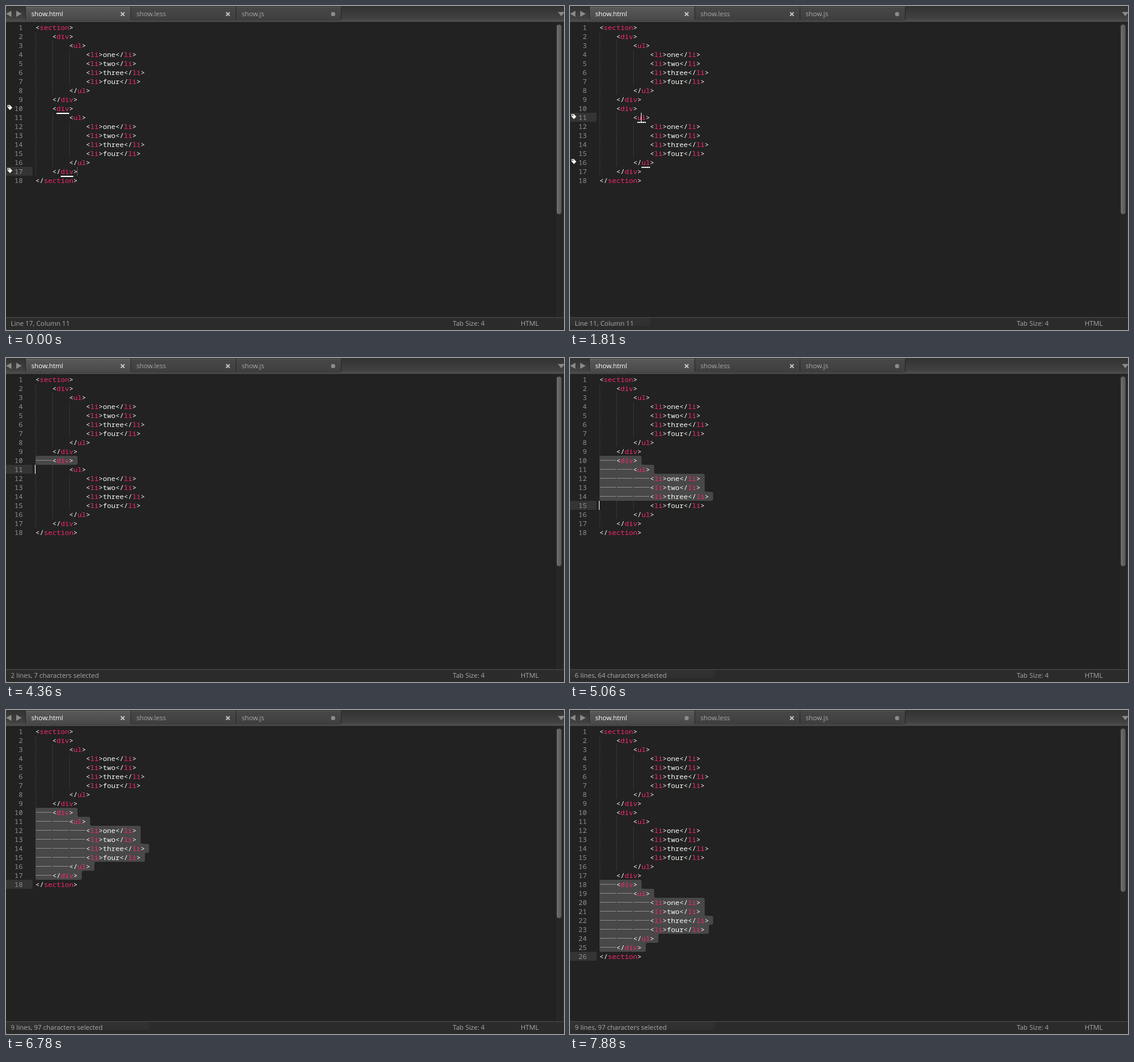
An HTML page for the animation above (8000 ms loop, 928 px wide and 540 px high).

```html
<!DOCTYPE html>
<html lang="en">
<head>
<meta charset="utf-8">
<title>Editor: duplicating a block</title>
<style>
  html, body { margin: 0; width: 100%; height: 100%; overflow: hidden; background: #222; }
  svg { display: block; width: 928px; height: 540px; }
  text { white-space: pre; }
  .ui { font: 11px "Open Sans", "Noto Sans", sans-serif; fill: #a8a8a8; }
  .code { font: 11.667px "Noto Sans Mono", "DejaVu Sans Mono", monospace; fill: #f8f8f2; }
  .code .tag { fill: #f92672; }
  .code .num { fill: #8f908a; text-anchor: end; }
</style>
</head>
<body>
<svg viewBox="0 0 928 540" xmlns="http://www.w3.org/2000/svg">
  <defs>
    <linearGradient id="bar" x2="0" y2="1"><stop stop-color="#323232"/><stop offset="1" stop-color="#444"/></linearGradient>
    <linearGradient id="front" x2="0" y2="1"><stop stop-color="#5a5a5a"/><stop offset="1" stop-color="#484848"/></linearGradient>
    <linearGradient id="back" x2="0" y2="1"><stop stop-color="#484848"/><stop offset="1" stop-color="#3e3e3e"/></linearGradient>
    <linearGradient id="thumb"><stop stop-color="#707070"/><stop offset="1" stop-color="#555"/></linearGradient>
  </defs>
  <rect width="928" height="540" fill="#222"/>
  <g id="tabs"></g>
  <path d="M912.5 28V518" stroke="#1c1c1c"/>
  <rect x="913" y="28" width="14" height="490" fill="#262626"/>
  <rect x="927" y="28" width="1" height="490" fill="#333"/>
  <rect id="scroll" x="916" y="31" width="8" rx="4" fill="url(#thumb)"/>
  <g id="editor"></g>
  <rect y="518" width="928" height="22" fill="#2b2b2b"/>
  <rect y="519" width="928" height="1" fill="#484848"/>
  <rect id="patch" y="520" height="13" fill="#313131"/>
  <g class="ui">
    <text id="message" x="8" y="533"></text>
    <text x="743" y="533">Tab Size: 4</text>
    <text x="856" y="533">HTML</text>
  </g>
</svg>
<script>
(() => {
const LOOP = 8000, LEFT = 49, CHAR = 7, ROW = 15, TAB = 4;
const SELECT_AT = 4360, DUPLICATE_AT = 7330;
const $ = id => document.getElementById(id);

const block = ['\t<div>', '\t\t<ul>',
  ...['one', 'two', 'three', 'four'].map(word => `\t\t\t<li>${word}</li>`),
  '\t\t</ul>', '\t</div>'];
const page = copies => ['<section>', ...Array(copies).fill(block).flat(), '</section>'];

// time, line, column, caret opacity (1 if left out)
const steps = [
  [0, 17, 11, .3], [150, 18, 11], [550, 18, 11, .5], [700, 18, 11, 0],
  [950, 17, 11], [1080, 16, 11], [1230, 15, 9], [1380, 14, 9], [1690, 12, 9],
  [1810, 11, 11], [2330, 11, 11, .5], [2450, 11, 11, 0], [2860, 11, 11],
  [2980, 10, 10], [3260, 10, 9], [3540, 10, 8], [3690, 10, 7], [3970, 10, 6],
  [4090, 10, 5], [4240, 10, 1],
  [4360, 11, 1], [4640, 12, 1], [4780, 13, 1], [4920, 14, 1], [5060, 15, 1],
  [5210, 16, 1], [5650, 16, 1, .5], [5800, 16, 1, 0], [5950, 17, 1],
  [6230, 18, 1], [6660, 18, 1, .5], [6780, 18, 1, 0],
  [7330, 26, 1], [7760, 26, 1, .5], [7880, 26, 1, 0]
];

const rect = (x, y, w, h, fill, extra = '') =>
  `<rect x="${x}" y="${y}" width="${w}" height="${h}" fill="${fill}" ${extra}/>`;
const rowTop = line => 28 + ROW * (line - 1);
const depth = row => row.match(/^\t*/)[0].length;
const columns = row => row.length + depth(row) * (TAB - 1);
const xAt = offset => LEFT + CHAR * offset;
const escapeTags = s => s.replace(/</g, '&lt;').replace(/>/g, '&gt;');

function codeRow(row, i) {
  const line = i + 1, y = rowTop(line) + 12;
  const marked = escapeTags(row.trim()).replace(/(&lt;\/?)(\w+)/g, '$1<tspan class="tag">$2</tspan>');
  return `<text class="num" x="28" y="${y}">${line}</text>` +
    `<text x="${xAt(depth(row) * TAB)}" y="${y}">${marked}</text>`;
}

function guides(row, i, selected) {
  const y = rowTop(i + 1);
  let out = '';
  for (let d = 0; d < depth(row); d++) {
    const x = xAt(d * TAB);
    out += selected
      ? `<path d="M${x + 1} ${y + 7.5}h26" stroke="#8c8c8c"/>`
      : `<path d="M${x + .5} ${y + (i % 2)}V${y + ROW}" stroke="#484848" stroke-dasharray="1 1"/>`;
  }
  return out;
}

// Outline of the selected rows with every corner rounded, inner ones too
function selection(rows, from, to) {
  const pts = [[LEFT, rowTop(from)]];
  for (let n = from; n < to; n++) {
    const x = xAt(columns(rows[n - 1]) + 1);
    const last = pts[pts.length - 1];
    if (n > from && last[0] === x) last[1] = rowTop(n + 1);
    else pts.push([x, rowTop(n)], [x, rowTop(n + 1)]);
  }
  pts.push([LEFT, rowTop(to)]);
  const toward = (a, b) => a.map((v, k) => v + 3 * Math.sign(b[k] - v));
  const d = pts.map((p, i) => {
    const before = pts[(i + pts.length - 1) % pts.length], after = pts[(i + 1) % pts.length];
    return `${i ? 'L' : 'M'}${toward(p, before)}Q${p} ${toward(p, after)}`;
  }).join('');
  return `<path d="${d}Z" fill="#484848"/>`;
}

function matchedTags(rows, line, col) {
  const pair = line === 18 ? [1, 18] : line === 17 || line === 10 ? [10, 17] : [11, 16];
  const span = n => {
    const [, open, name] = rows[n - 1].match(/(<\/?)(\w+)/);
    const start = depth(rows[n - 1]) * TAB + open.length;
    return [start, start + name.length];
  };
  const inside = pair.includes(line) && col - 1 >= span(line)[0] && col - 1 <= span(line)[1];
  return pair.map(n => {
    const [a, b] = span(n), x = xAt(a), y = rowTop(n);
    const mark = inside
      ? rect(x, y + ROW, xAt(b) - x, 1, '#fff') +
        `<path d="M${x} ${y + ROW + 1.5}H${xAt(b)}" stroke="#fff" stroke-dasharray="2 1"/>`
      : rect(x, y + ROW, xAt(b) - x, 2, '#fff');
    return mark + `<path transform="translate(0 ${y})" fill="#f4f4f0" d="M2.5 2h4l4 4.5-4 4-4-4.5z"/>` +
      `<circle cx="4.6" cy="${y + 4}" r="1" fill="#222"/>`;
  }).join('');
}

function tabs(edited) {
  const cross = x => `<path d="M${x - 3} 10.5l6 6m0-6l-6 6" stroke="#c4c4c4" stroke-width="1.8"/>`;
  const dot = x => `<circle cx="${x}" cy="13.5" r="3.5" fill="#8c8c8c"/>`;
  const tab = (name, x, front, mark) =>
    rect(x, 1, 174, 23, `url(#${front ? 'front' : 'back'})`) +
    rect(x, 1, 174, 1, front ? '#686868' : '#555') +
    rect(x + 174, 2, 1, 21, '#262626') +
    `<text class="ui" x="${x + 9}" y="17" ${front ? 'style="fill:#fff"' : ''}>${name}</text>` + mark(x + 161);
  return rect(0, 0, 928, 24, 'url(#bar)') + rect(0, 23, 928, 1, '#555') +
    rect(0, 24, 928, 3, '#464646') + rect(0, 27, 928, 1, '#191919') +
    rect(32, 2, 1, 21, '#262626') +
    tab('show.html', 33, true, edited ? dot : cross) +
    tab('show.less', 208, false, cross) + tab('show.js', 383, false, dot) +
    '<path d="M9 8v10l-9-5zM17 8v10l9-5zM918 10h11l-5.5 7z" fill="#8a8a8a"/>';
}

function draw([time, line, col, caret = 1]) {
  const edited = time >= DUPLICATE_AT, selecting = time >= SELECT_AT;
  const rows = page(edited ? 3 : 2);
  const from = edited ? 18 : 10;
  const selected = i => selecting && i + 1 >= from && i + 1 < line;

  $('tabs').innerHTML = tabs(edited);
  $('scroll').setAttribute('height', edited ? 272 : 316);
  $('patch').setAttribute('width', time < 950 ? 0 : time < 4360 ? 133 : time < 4640 ? 0 : 239);
  $('editor').innerHTML =
    rect(0, rowTop(line), 44, ROW, '#343434') +
    (selecting ? selection(rows, from, line) : '') +
    rows.map((row, i) => guides(row, i, selected(i))).join('') +
    `<g class="code">${rows.map(codeRow).join('')}</g>` +
    (selecting ? '' : matchedTags(rows, line, col)) +
    rect(xAt(col - 1) - 1, rowTop(line), 1, ROW, '#f8f8f0', `opacity="${caret}"`);

  const chars = rows.slice(from - 1, line - 1).reduce((sum, row) => sum + row.length + 1, 0);
  $('message').textContent = selecting
    ? `${line - from + 1} lines, ${chars} characters selected`
    : `Line ${line}, Column ${col}`;
}

let shown;
const start = performance.now();
function tick() {
  const t = Math.max(0, performance.now() - start) % LOOP;
  const step = steps.filter(([time]) => time <= t).pop();
  if (step !== shown) draw(shown = step);
  requestAnimationFrame(tick);
}
tick();
})();
</script>
</body>
</html>
```
